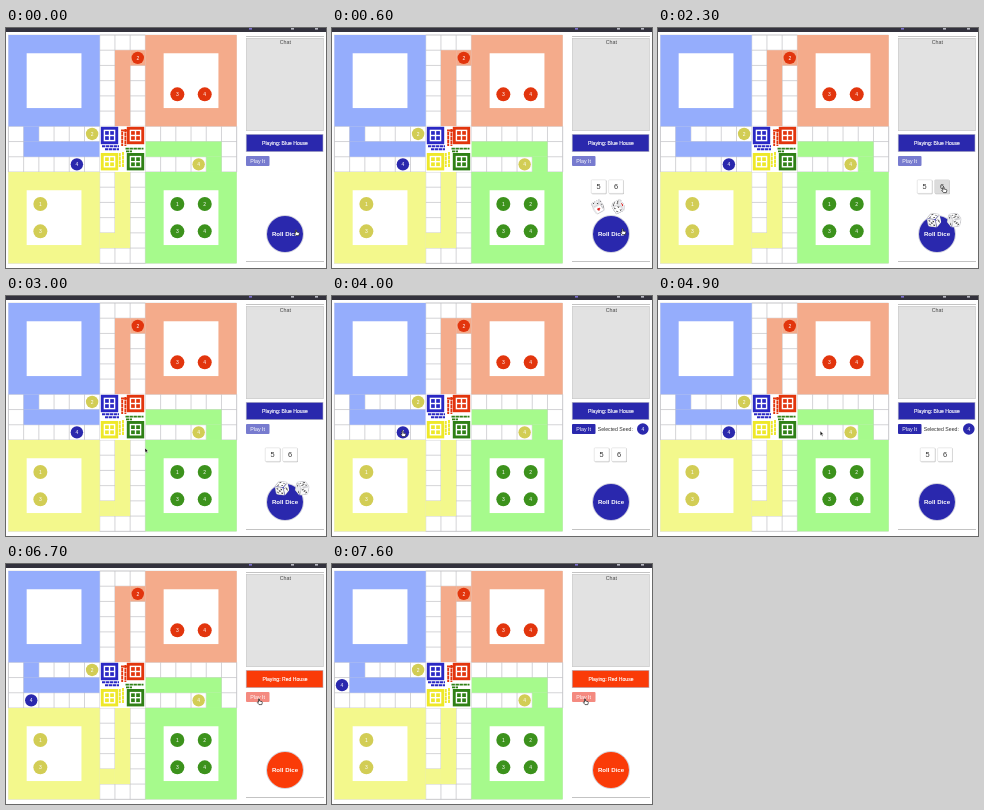
Write an HTML page that moves like this. It is 320 px wide and 240 px high and loops after 8000 ms.

```html
<!DOCTYPE html>
<html lang="en">
<head>
<meta charset="utf-8">
<title>Board game</title>
<style>
  html, body { margin: 0; width: 100%; height: 100%; overflow: hidden; background: #fff; }
  svg { position: absolute; left: 0; top: 0; width: 320px; height: 240px; }
  text { font-family: "Liberation Sans", Arial, sans-serif; text-anchor: middle; }
  .die { position: absolute; left: 0; top: 0; width: 0; height: 0; transform-style: preserve-3d; }
  .die div {
    position: absolute; left: -5px; top: -5px; width: 10px; height: 10px; border-radius: 1.5px;
    box-sizing: border-box; border: .3px solid #c4c4c8; backface-visibility: hidden;
  }
</style>
</head>
<body>
<svg id="stage" viewBox="0 0 320 240"></svg>
<svg id="top" viewBox="0 0 320 240" style="z-index:2"></svg>
<script>
const LOOP = 8000, CELL = 15.22, LEFT = 2.4, TOP = 7;
const SELECT_AT = 3800, PLAY_AT = 5400;
const INK = { blue: '#2a28ad', red: '#e2350d', yellow: '#d2cd55', green: '#3c921c' };
const PALE = { blue: '#95adfc', red: '#f4ab8b', yellow: '#f3f88c', green: '#a6fa8c' };
const stage = document.getElementById('stage');
const colX = c => LEFT + c * CELL;
const rowY = r => TOP + r * CELL;

function add(tag, attrs, parent = stage, label) {
  const node = document.createElementNS('http://www.w3.org/2000/svg', tag);
  for (const key in attrs) node.setAttribute(key, attrs[key]);
  if (label !== undefined) node.textContent = label;
  parent.append(node);
  return node;
}
const rect = (x, y, width, height, fill, parent, more) =>
  add('rect', { x, y, width, height, fill, ...more }, parent);
const text = (x, y, label, size, fill, parent, more) =>
  add('text', { x, y, fill, 'font-size': size, ...more }, parent, label);
const cells = (c, r, w, h, fill) => rect(colX(c), rowY(r), w * CELL, h * CELL, fill);

function seed(x, y, color, label, r = 6.2, parent = stage) {
  const g = add('g', { transform: `translate(${x} ${y})` }, parent);
  add('circle', { r, fill: INK[color] }, g);
  text(0, 1.8, label, 5, '#fff', g);
  return g;
}
const cellSeed = (c, r, color, label) => seed(colX(c + .5), rowY(r + .5), color, label);

// Board
rect(0, 0, 320, 4, '#33323d');
[[243, '#7d6fd0'], [285, '#b9b9c4'], [309, '#b9b9c4']].forEach(([x, fill]) => rect(x, 0, 3, 1.6, fill));
rect(LEFT, TOP, 15 * CELL, 15 * CELL, '#fff', stage, { stroke: '#ccc', 'stroke-width': .5 });
let grid = '';
for (let i = 0; i <= 15; i++) {
  if (i >= 6 && i <= 9) grid += `M${colX(i)} ${TOP}v${15 * CELL}M${LEFT} ${rowY(i)}h${15 * CELL}`;
  else grid += `M${colX(i)} ${rowY(6)}v${3 * CELL}M${colX(6)} ${rowY(i)}h${3 * CELL}`;
}
add('path', { d: grid, stroke: '#c2c2c6', 'stroke-width': .7 });

function house(c, r, color, labels) {
  cells(c, r, 6, 6, PALE[color]);
  cells(c + 1.2, r + 1.2, 3.6, 3.6, '#fff');
  labels.forEach(n => seed(colX(c + 2.1 + (n - 1) % 2 * 1.8), rowY(r + 2.1 + (n > 2) * 1.8), color, n, 7));
}
house(0, 0, 'blue', []);
house(9, 0, 'red', [3, 4]);
house(0, 9, 'yellow', [1, 3]);
house(9, 9, 'green', [1, 2, 3, 4]);

[['blue', 1, 7, 5, 1, 1, 6], ['red', 7, 1, 1, 5, 8, 1],
 ['yellow', 7, 9, 1, 5, 6, 13], ['green', 9, 7, 5, 1, 13, 8]].forEach(([color, c, r, w, h, startC, startR]) => {
  cells(c, r, w, h, PALE[color]);
  cells(startC, startR, 1, 1, PALE[color]);
});

// Centre emblem
rect(colX(6), rowY(6), 3 * CELL, 3 * CELL, '#fff');
function emblem(x, y, fill) {
  rect(x - 8.7, y - 8.7, 17.4, 17.4, fill);
  rect(x - 5.8, y - 5.8, 11.6, 11.6, '#fff');
  for (const dx of [-4.4, .7]) for (const dy of [-4.4, .7]) rect(x + dx, y + dy, 3.7, 3.7, fill);
}
[['#2a28c4', 103.5, 107.5, 'M96 118.2h17M99 121.3h14'],
 [INK.red, 129.5, 107.5, 'M115 102.5h6M116.2 104v14M119.4 101v17'],
 ['#eee829', 103.5, 133.7, 'M113.8 125v14M117 124v15'],
 ['#2f8016', 129.5, 133.7, 'M119.5 120.6h18M120 123.4h6']].forEach(([ink, x, y, d]) => {
  add('path', { d, fill: 'none', stroke: ink, 'stroke-width': 1.9, 'stroke-dasharray': '3.4 .6' });
  emblem(x, y, ink);
});

cellSeed(8, 1, 'red', 2);
cellSeed(5, 6, 'yellow', 2);
cellSeed(12, 8, 'yellow', 4);
const runner = cellSeed(4, 8, 'blue', 4);
const ROUTE = [[4, 8], [3, 8], [2, 8], [1, 8], [0, 8], [0, 7]];

// Side panel
add('path', { d: 'M240 8.5h78M240 233.5h78', stroke: '#aaa', 'stroke-width': .7 });
rect(240.3, 10.3, 77, 92.4, '#e2e2e2', stage, { stroke: '#c4c4c4', 'stroke-width': .6 });
text(279.3, 16, 'Chat', 5.3, '#444');
const banner = rect(240.2, 106.3, 76.8, 17.4, INK.blue, stage, { stroke: '#b4b4c4', 'stroke-width': .6 });
const turn = text(279, 117, '', 5.1, '#fff', stage, { stroke: '#fff', 'stroke-width': .15 });
const playButton = rect(240, 128, 23.5, 10, INK.blue, stage, { rx: 1 });
text(251.7, 134.8, 'Play It', 5.3, '#fff');
const selected = add('g', {});
text(283.3, 134.8, 'Selected Seed:', 5.2, '#333', selected);
seed(310.8, 133, 'blue', 4, 5.8, selected);

const numbers = add('g', {});
const numberBoxes = [5, 6].map((n, i) => {
  const x = 259.2 + i * 17.4;
  rect(x + .4, 152.3, 15, 14, '#c4c4c4', numbers, { rx: 1 });
  const box = rect(x, 151.8, 14.8, 13.6, '#fff', numbers, { rx: 1, stroke: '#d4d4d4', 'stroke-width': .5 });
  text(x + 7.4, 161.2, n, 7.4, '#333', numbers);
  return box;
});

add('circle', { cx: 279, cy: 206, r: 18.5, fill: 'none', stroke: '#b4b4c4', 'stroke-width': .6 });
const rollButton = add('circle', { cx: 279, cy: 206, r: 18 });
text(279, 208.3, 'Roll Dice', 6.1, '#fff', stage, { 'font-weight': 700 });

// Dice
const PIPS = { 1: [[0, 0]], 2: [[-1, -1], [1, 1]], 4: [[-1, -1], [1, 1], [-1, 1], [1, -1]] };
PIPS[3] = [...PIPS[2], ...PIPS[1]];
PIPS[5] = [...PIPS[4], ...PIPS[1]];
PIPS[6] = [...PIPS[4], [-1, 0], [1, 0]];
const SIDES = ['', 'rotateX(90deg)', 'rotateY(-90deg)', 'rotateY(90deg)', 'rotateX(-90deg)', 'rotateY(180deg)'];

function makeDie(faces) {
  const die = document.createElement('div');
  die.className = 'die';
  faces.forEach((n, i) => {
    const face = document.createElement('div');
    const dot = n === 1 ? '#d22 1.4px, transparent 1.8px' : '#222 .55px, transparent 1px';
    face.style.background = PIPS[n].map(([x, y]) =>
      `radial-gradient(circle at ${50 + x * 27}% ${50 + y * 27}%, ${dot})`).join() +
      `, ${['#fafafa', '#fff', '#ececee'][i % 3]}`;
    face.style.transform = `${SIDES[i]} translateZ(5px)`;
    die.append(face);
  });
  document.body.append(die);
  return die;
}
const dice = [makeDie([5, 4, 6, 3, 1, 2]), makeDie([3, 5, 2, 6, 4, 1])];

// Cursor
const cursor = add('g', {}, document.getElementById('top'));
const arrow = add('path', { d: 'M0 0V4.6L1.1 3.6 1.9 5.3 2.7 4.9 1.9 3.3H3.3Z',
  fill: '#111', stroke: '#fff', 'stroke-width': .4 }, cursor);
const hand = add('path', { d: 'M-.5 0Q0 -.6 .5 0V2L3 2.6Q3.5 2.8 3.3 3.6L2.8 5.6H0L-1.8 3.4Q-1.4 2.6 -.5 3.3Z',
  fill: '#fff', stroke: '#222', 'stroke-width': .7 }, cursor);

const CURSOR = [[0, 290, 202], [600, 290.5, 201], [950, 290, 200], [1400, 285.5, 159], [2600, 285.5, 159],
  [3000, 139, 152], [3400, 70.5, 135], [4600, 70.5, 135], [5200, 253, 135]];
const DICE = [[200, 262, 175, .5], [600, 266, 178.7, .95], [1200, 276, 192.3, 1]];

function at(table, t) {
  if (t <= table[0][0]) return table[0].slice(1);
  const i = table.findIndex(row => row[0] > t);
  if (i < 0) return table[table.length - 1].slice(1);
  const a = table[i - 1], b = table[i], p = (t - a[0]) / (b[0] - a[0]);
  const eased = p * p * (3 - 2 * p);
  return a.slice(1).map((v, k) => v + (b[k + 1] - v) * eased);
}
const show = (node, on) => { node.style.display = on ? '' : 'none'; };

function render(t) {
  const red = t >= PLAY_AT, picked = t >= SELECT_AT && !red;
  const main = red ? '#fa3b08' : INK.blue;
  banner.setAttribute('fill', main);
  rollButton.setAttribute('fill', main);
  turn.textContent = `Playing: ${red ? 'Red' : 'Blue'} House`;
  playButton.setAttribute('fill', red ? '#f48a80' : picked ? INK.blue : '#777bcf');
  show(selected, picked);
  show(numbers, t >= 300 && !red);
  numbers.setAttribute('transform', `translate(${picked ? 3 : 0} 0)`);

  const [x, y] = at(CURSOR, t);
  cursor.setAttribute('transform', `translate(${x} ${y})`);
  const overSix = t > 300 && x > 276 && x < 291 && y > 152 && y < 165;
  numberBoxes[1].setAttribute('fill', overSix ? '#dcdcdc' : '#fff');
  const pointing = overSix || Math.hypot(x - 279, y - 206) < 18 ||
    Math.hypot(x - 71, y - 136) < 6 || (x > 240 && x < 264 && y > 128 && y < 138);
  show(hand, pointing);
  show(arrow, !pointing);

  const [dx, dy, scale] = at(DICE, t);
  const spin = (1 - Math.min(1, Math.max(0, (t - 200) / 1000))) ** 2;
  dice.forEach((die, i) => {
    show(die, t >= 200 && t < SELECT_AT);
    die.style.transform = `translate(${dx + i * 20.3}px, ${dy}px) scale(${scale}) ` +
      `rotateZ(${i ? 12 : -12}deg) rotateX(${-32 + spin * 250}deg) rotateY(${(i ? 34 : -34) + spin * 540}deg)`;
  });

  const step = Math.min(5, Math.max(0, Math.floor((t - 5000) / 500)));
  const [c, r] = ROUTE[step];
  runner.setAttribute('transform', `translate(${colX(c + .5)} ${rowY(r + .5)})`);
}

const start = performance.now();
function tick() {
  render((performance.now() - start) % LOOP);
  requestAnimationFrame(tick);
}
tick();
</script>
</body>
</html>
```
